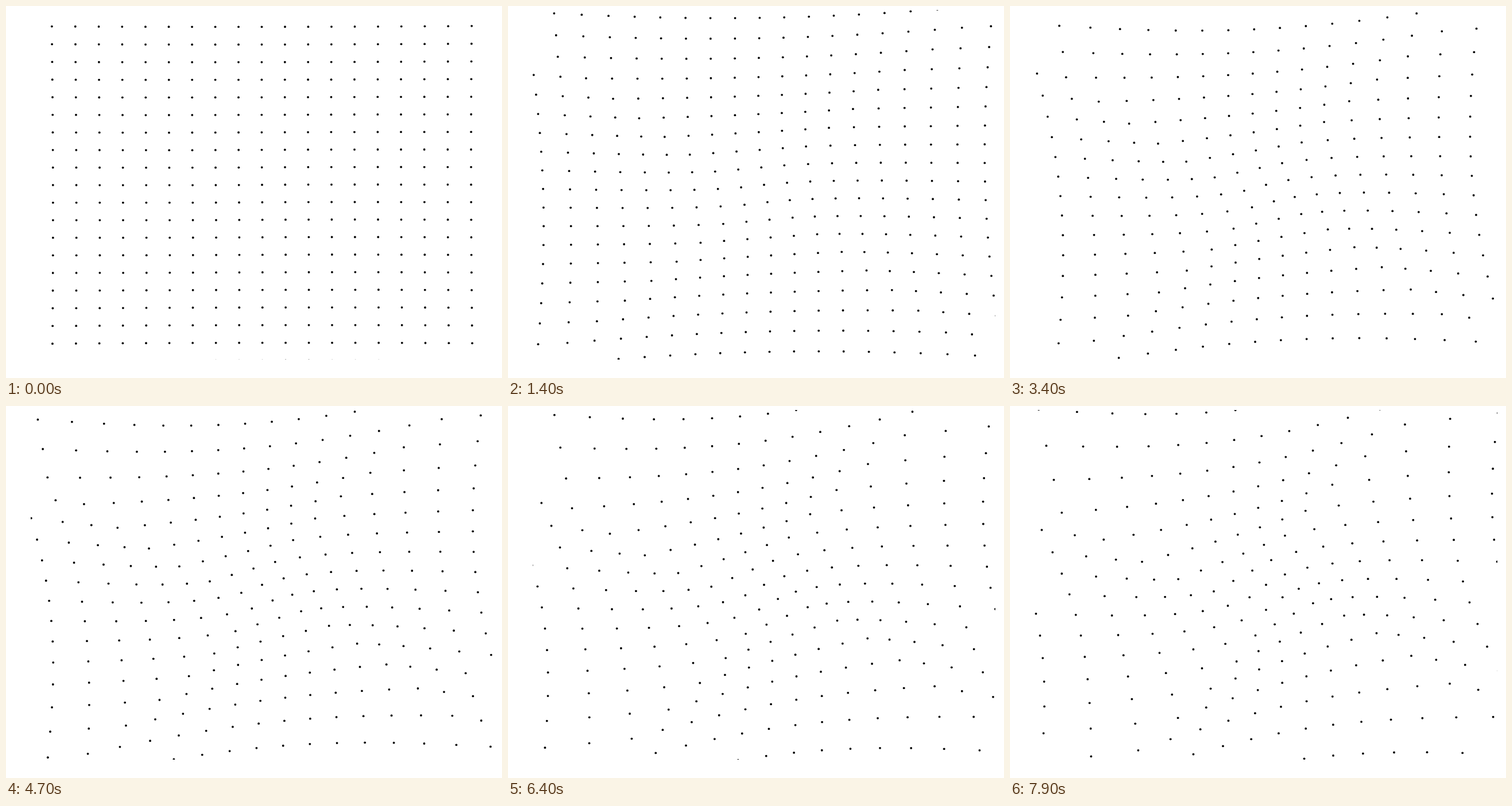
Write an HTML page without scripts that moves like this. It is 864x648 px and loops after 8000 ms.

```html
<!DOCTYPE html>
<html lang="en">
<head>
<meta charset="utf-8">
<title>Twisting dot grid</title>
<style>
  @property --t {
    syntax: "<number>";
    inherits: true;
    initial-value: 0.1;
  }
  html, body {
    margin: 0;
    width: 100%;
    height: 100%;
    overflow: hidden;
    background: #fff;
  }
  .stage {
    display: block;
    width: 864px;
    height: 648px;
    animation: run 8s steps(80) infinite;
  }
  @keyframes run {
    from { --t: 0.1; }
    to { --t: 8.1; }
  }
  /* Each square ring turns at 0.8 of the speed of the ring inside it,
     while every dot drifts outwards with the square of its radius. */
  circle {
    --ring: max(var(--x), -1 * var(--x) - 1, var(--y), -1 * var(--y) - 1);
    --turn: calc(var(--t) * 5.625deg * pow(0.8, var(--ring)));
    --grow: calc(1 + 0.0005 * var(--t) * (1 + var(--x) * var(--x) + var(--y) * var(--y)));
    transform: translate(
      calc(40.3px * var(--grow) * (var(--x) * cos(var(--turn)) - var(--y) * sin(var(--turn)))),
      calc(-30.45px * var(--grow) * (var(--x) * sin(var(--turn)) + var(--y) * cos(var(--turn))))
    );
  }
</style>
</head>
<body>
<svg class="stage" width="864" height="648" viewBox="0 0 864 648">
  <defs>
    <g id="row">
      <circle r="1.9" style="--x:-10"/>
      <circle r="1.9" style="--x:-9"/>
      <circle r="1.9" style="--x:-8"/>
      <circle r="1.9" style="--x:-7"/>
      <circle r="1.9" style="--x:-6"/>
      <circle r="1.9" style="--x:-5"/>
      <circle r="1.9" style="--x:-4"/>
      <circle r="1.9" style="--x:-3"/>
      <circle r="1.9" style="--x:-2"/>
      <circle r="1.9" style="--x:-1"/>
      <circle r="1.9" style="--x:0"/>
      <circle r="1.9" style="--x:1"/>
      <circle r="1.9" style="--x:2"/>
      <circle r="1.9" style="--x:3"/>
      <circle r="1.9" style="--x:4"/>
      <circle r="1.9" style="--x:5"/>
      <circle r="1.9" style="--x:6"/>
      <circle r="1.9" style="--x:7"/>
      <circle r="1.9" style="--x:8"/>
      <circle r="1.9" style="--x:9"/>
    </g>
  </defs>
  <svg x="43" y="7" width="806" height="609" viewBox="-403 -304.5 806 609" overflow="hidden">
    <use href="#row" style="--y:-10"/>
    <use href="#row" style="--y:-9"/>
    <use href="#row" style="--y:-8"/>
    <use href="#row" style="--y:-7"/>
    <use href="#row" style="--y:-6"/>
    <use href="#row" style="--y:-5"/>
    <use href="#row" style="--y:-4"/>
    <use href="#row" style="--y:-3"/>
    <use href="#row" style="--y:-2"/>
    <use href="#row" style="--y:-1"/>
    <use href="#row" style="--y:0"/>
    <use href="#row" style="--y:1"/>
    <use href="#row" style="--y:2"/>
    <use href="#row" style="--y:3"/>
    <use href="#row" style="--y:4"/>
    <use href="#row" style="--y:5"/>
    <use href="#row" style="--y:6"/>
    <use href="#row" style="--y:7"/>
    <use href="#row" style="--y:8"/>
    <use href="#row" style="--y:9"/>
  </svg>
</svg>
</body>
</html>
```
